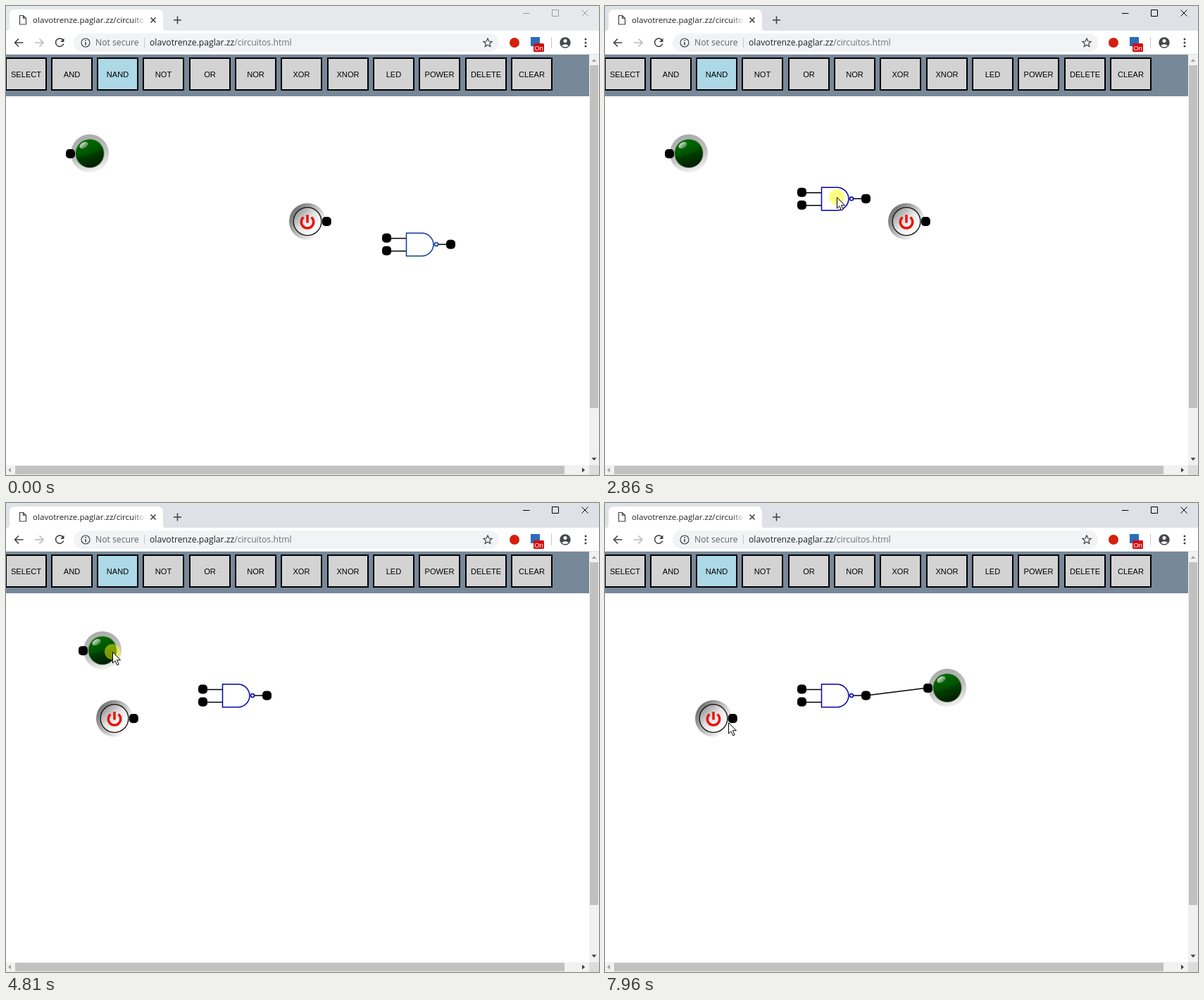
An HTML page that plays this animation: 842x665 px, repeating every 8 s.

```html
<!DOCTYPE html>
<html lang="pt">
<head>
<meta charset="utf-8">
<style>
  html, body { margin: 0; width: 100%; height: 100%; overflow: hidden; background: #fff; }
  svg { display: block; width: 100%; height: 100%; }
  .ui { font: 12.2px "Open Sans", "Noto Sans", sans-serif; fill: #202124; }
  .label { font: 11.1px "Liberation Sans", Arial, sans-serif; text-anchor: middle; }
  .line { fill: none; stroke: #3f4246; stroke-width: 1.6; }
  .thin { stroke-width: 1.2; }
  .wire { stroke: #000; stroke-width: 1.5; }
</style>
</head>
<body>
<svg viewBox="0 0 842 665">
  <defs>
    <linearGradient id="fade" x1="0" x2="1">
      <stop offset="0" stop-color="#fff" stop-opacity="0"/><stop offset="1" stop-color="#fff"/>
    </linearGradient>
    <linearGradient id="ledRim" x1=".3" y1="0" x2=".6" y2="1">
      <stop offset="0" stop-color="#a9a9a9"/><stop offset=".5" stop-color="#bdbdbd"/><stop offset="1" stop-color="#f2f2f2"/>
    </linearGradient>
    <linearGradient id="ledGlass" x1=".3" y1="0" x2=".65" y2="1">
      <stop offset="0" stop-color="#007000"/><stop offset=".45" stop-color="#005400"/><stop offset="1" stop-color="#001c00"/>
    </linearGradient>
    <linearGradient id="shine" x1="0" y1="0" x2=".4" y2="1">
      <stop offset="0" stop-color="#e4ece4"/><stop offset="1" stop-color="#4d8a4d"/>
    </linearGradient>
    <linearGradient id="powerRim" x1=".05" y1=".2" x2=".85" y2=".8">
      <stop offset="0" stop-color="#6c6c6c"/><stop offset=".45" stop-color="#b4b4b4"/><stop offset="1" stop-color="#fff"/>
    </linearGradient>
    <linearGradient id="powerFace" x1=".1" y1=".1" x2=".8" y2=".8">
      <stop offset="0" stop-color="#949494"/><stop offset=".55" stop-color="#e6e6e6"/><stop offset="1" stop-color="#fff"/>
    </linearGradient>
    <clipPath id="tabClip"><rect x="38" y="8" width="160" height="24"/></clipPath>
    <rect id="dot" x="-6.5" y="-6.5" width="13" height="13" rx="4.8"/>
  </defs>

  <!-- title bar and tab -->
  <rect id="titleBar" width="842" height="36"/>
  <path d="M0 36q5 0 5-6V13q0-8 8-8H215q8 0 8 8v17q0 6 5 6z" fill="#fff"/>
  <path d="M19.5 13.5h5l4 4v8.5h-9zM24.5 13.5v4h4" class="line thin"/>
  <g clip-path="url(#tabClip)">
    <text x="38" y="24" class="ui" style="font-size:11.6px">olavotrenze.paglar.zz/circuitos.html</text>
  </g>
  <rect x="180" y="10" width="18" height="20" fill="url(#fade)"/>
  <path d="M205.5 16.5l7 7m0-7l-7 7M238 20h11m-5.5-5.5v11" class="line"/>
  <path id="windowButtons" d="M734 10.5h9.5M775.500 5.500h9v9h-9zM817.5 5.5l9 9m0-9l-9 9" fill="none"/>

  <!-- address bar -->
  <rect y="35" width="842" height="34" fill="#fff"/>
  <rect x="96" y="39" width="604" height="26" rx="13" fill="#f1f3f4"/>
  <path d="M24.5 52H12.5m5.500-5.500l-5.500 5.500 5.500 5.500" class="line"/>
  <path d="M41 52h12m-5.500-5.500l5.500 5.500-5.500 5.500" class="line" style="stroke:#b9bbbe"/>
  <path d="M81 48.5a5.700 5.700 0 1 0 .7 5" class="line"/>
  <path d="M82.5 45.5v5.500h-5.500z" fill="#3f4246"/>
  <circle cx="113" cy="52" r="6" class="line thin"/>
  <path d="M113 51v4.500M113 48v1.600" class="line"/>
  <text x="127" y="56" class="ui" style="fill:#5f6368">Not secure</text>
  <path d="M196.5 45v14M774.5 44v16" stroke="#c4c7ca"/>
  <text x="204" y="56" class="ui">olavotrenze.paglar.zz<tspan fill="#6c7075">/circuitos.html</tspan></text>
  <path d="M684 46l1.800 4 4.300.4-3.300 2.900 1 4.300-3.800-2.300-3.800 2.300 1-4.300-3.300-2.900 4.300-.4z" class="line thin"/>
  <circle cx="722" cy="52" r="7" fill="#d5200c"/>
  <rect x="745" y="44" width="13" height="13" fill="#2b6cb8"/>
  <rect x="749" y="53" width="15" height="12" rx="1.5" fill="#d20d0d"/>
  <text x="756.5" y="62.5" class="label" style="font-size:9.5px" fill="#fff">On</text>
  <circle cx="794" cy="52" r="7.7" fill="#44474b"/>
  <circle cx="794" cy="49.5" r="2.5" fill="#fff"/>
  <path d="M789 56.5q5-4.500 10 0q-5 3.500-10 0" fill="#fff"/>
  <path d="M823 47v11" stroke="#3f4246" stroke-width="3" stroke-linecap="round" stroke-dasharray="0 5"/>
  <path d="M0 68.5h842" stroke="#dfe1e3"/>

  <!-- page -->
  <rect y="69" width="828" height="59" fill="#789"/>
  <g id="toolbar"></g>
  <g id="led">
    <circle r="27" fill="url(#ledRim)"/>
    <circle r="21" fill="#a3aaa3"/>
    <circle r="20" fill="url(#ledGlass)"/>
    <path d="M-19 5Q0 4 18-7Q21 5 12 15Q0 23-12 16Q-18 11-19 5" fill="#001800" opacity=".25"/>
    <ellipse cx="-8.5" cy="-11.5" rx="6.5" ry="4" transform="rotate(-28 -8.5 -11.5)" fill="url(#shine)"/>
    <use href="#dot" x="-27.5" y=".5"/>
  </g>
  <g id="power">
    <circle r="26" fill="url(#powerRim)"/>
    <circle r="19.8" fill="url(#powerFace)" stroke="#111" stroke-width="1.3"/>
    <path d="M-5.5-6a8.700 8.700 0 1 0 11 0M0-9.500v11.500" fill="none" stroke="#e8140c" stroke-width="3.5"/>
  </g>
  <use id="powerDot" href="#dot"/>
  <g id="gate">
    <path d="M-28 8H0M-28 26H0M46 16.5H63" class="wire"/>
    <g id="gateBody" fill="#fff" stroke-width="1.5">
      <path d="M.5.500H23.500a16.700 16.300 0 0 1 0 32.500H.5z"/><circle cx="43" cy="16.500" r="2.5"/>
    </g>
    <use href="#dot" x="-27.5" y="7.5"/><use href="#dot" x="-27.5" y="25.5"/><use href="#dot" x="63.5" y="16.5"/>
  </g>
  <line id="cable" x1="370.5" y1="273" class="wire"/>

  <!-- scrollbars -->
  <path d="M828 69h14v582h-14zM0 651h828v14H0z" fill="#f1f1f1"/>
  <rect x="828" y="651" width="14" height="14" fill="#dcdcdc"/>
  <rect id="thumb" x="829" y="84" width="12" height="486"/>
  <rect x="13" y="652" width="780" height="12" fill="#c1c1c1"/>
  <path d="M831.5 79h7l-3.500-4zM7 654.5v7l-4-3.500z" fill="#a3a3a3"/>
  <path d="M831.5 640.5h7l-3.500 4zM818 654.5v7l4-3.500z" fill="#404040"/>

  <g id="cursor">
    <circle id="press" r="11" fill="#ff0" fill-opacity=".5"/>
    <path d="M.5.5V16l3.500-3.300 2.700 6.100 2.500-1.100-2.700-6h5z" fill="#fff" stroke="#000"/>
  </g>
</svg>

<script>
const LOOP = 8000, STEP = 78, START = 600, LAG = 16;
const el = id => document.getElementById(id);

el('toolbar').innerHTML = 'SELECT AND NAND NOT OR NOR XOR XNOR LED POWER DELETE CLEAR'.split(' ')
  .map((name, i) => {
    const x = Math.round(i * 65.3 - 1.5);
    return `<rect x="${x + 1}" y="74" width="57" height="45" stroke="#000" stroke-width="2"
      fill="${name === 'NAND' ? 'lightblue' : 'lightgray'}"/>
      <text class="label" x="${x + 29.5}" y="101">${name}</text>`;
  }).join('');

// Each pointer move eases to a point, optionally along a curve bent towards `via`.
const entry = [842, 318];
const moves = [
  { from: START, to: 1460, point: [590, 336] },
  { from: 1690, to: 2860, point: [329, 271], via: [304, 446] },
  { from: 2930, to: 3400, point: [441, 296] },
  { from: 3408, to: 3948, point: [167, 296], via: [309, 348] },
  { from: 4190, to: 4630, point: [120, 211] },
  { from: 4748, to: 5208, point: [487, 264], via: [420, 209] },
  { from: 5500, to: 5990, point: [375, 275] },
  { from: 6480, to: 6900, point: [456, 264] },
  { from: 7300, to: 7930, point: [175, 311], via: [80, 400] }
];

const clamp = (v, lo, hi) => Math.min(Math.max(v, lo), hi);
const ease = k => k * k * (3 - 2 * k);

function pointer(t) {
  let start = entry;
  for (const { from, to, point, via } of moves) {
    if (t < from) break;
    const s = ease(clamp((t - from) / (to - from), 0, 1));
    start = start.map((a, i) => {
      const b = point[i], c = via ? via[i] : (a + b) / 2;
      return (1 - s) ** 2 * a + 2 * s * (1 - s) * c + s * s * b;
    });
  }
  return start;
}

const drags = {
  gate: { at: [568, 321.5], from: 1690, to: 2900 },
  power: { at: [428, 305.5], from: 3408, to: 4180 },
  powerDot: { at: [455.3, 305.5], from: 3408, to: 4180, lag: LAG + 7 },
  led: { at: [119, 209], from: 4640, to: 5490 }
};
const wiring = { from: 6470, to: 7030 };
const during = (t, { from, to }) => t >= from && t < to;
const moveTo = (id, [x, y]) => el(id).setAttribute('transform', `translate(${x} ${y})`);
const set = (id, attrs) => Object.entries(attrs).forEach(([k, v]) => el(id).setAttribute(k, v));

function draw(time) {
  const t = START + Math.floor((time - START) / STEP + 0.1) * STEP;
  const tip = pointer(t);

  for (const [id, { at, from, to, lag = LAG }] of Object.entries(drags)) {
    const grabbed = pointer(from), held = pointer(clamp(t - lag, from, to));
    moveTo(id, at.map((v, i) => v + held[i] - grabbed[i]));
  }

  moveTo('cursor', tip.map(Math.round));
  const pressed = [...Object.values(drags), wiring].some(span => during(t, span));
  set('cursor', { visibility: t >= START ? 'visible' : 'hidden' });
  set('press', { opacity: pressed ? 1 : 0 });

  const [x2, y2] = during(t, wiring) ? tip : [458.5, 262];
  set('cable', { x2, y2, opacity: t >= wiring.from ? 1 : 0 });

  const active = t >= drags.gate.from;
  set('titleBar', { fill: active ? '#dee1e6' : '#e7eaed' });
  set('windowButtons', { stroke: active ? '#000' : '#999' });
  set('gateBody', { stroke: active ? '#0000a8' : '#0b3a9c' });
  set('thumb', { fill: t >= START && tip[0] > 828 ? '#a8a8a8' : '#c1c1c1' });
}

const origin = performance.now();
function tick() {
  draw((performance.now() - origin) % LOOP);
  requestAnimationFrame(tick);
}
tick();
</script>
</body>
</html>
```
